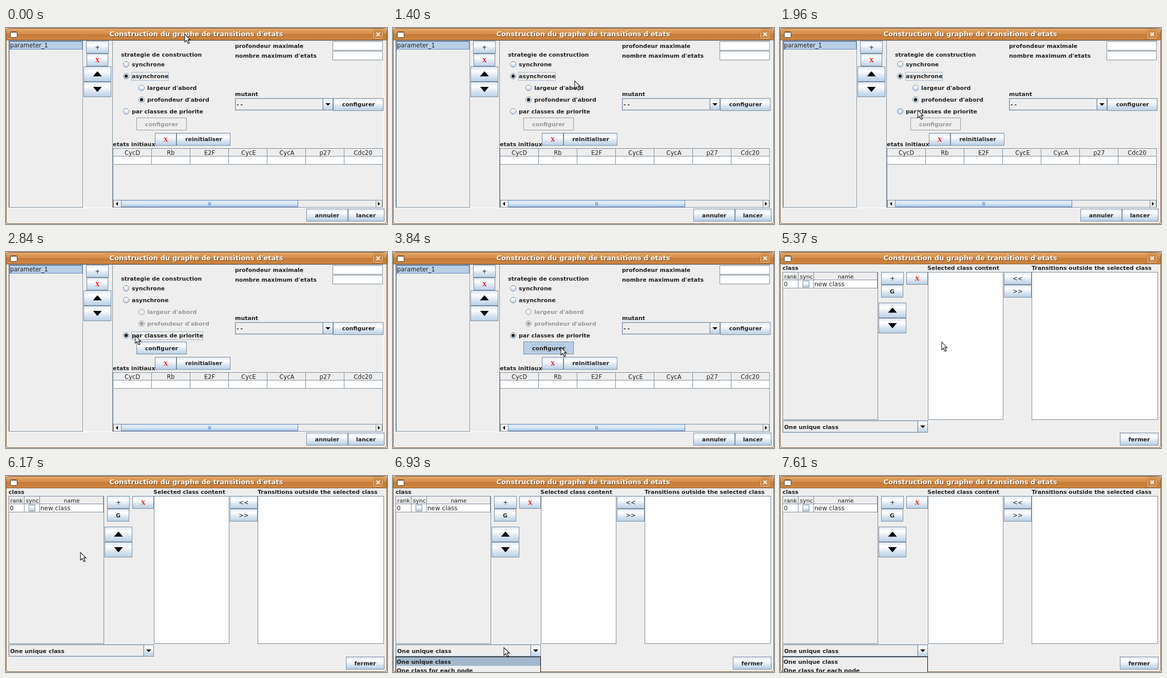
These frames come from a looping animation (742 px wide and 383 px high, 8000 ms). An HTML page:

```html
<!DOCTYPE html>
<html lang="fr">
<head>
<meta charset="utf-8">
<title>Construction du graphe</title>
<style>
html, body { margin: 0; width: 100%; height: 100%; overflow: hidden; background: #ddd; }
svg { display: block; width: 100%; height: 100%;
  --ink: #222; --ring: #7a8a99; --face: url(#face); }
text { font: bold 11px "DejaVu Sans", sans-serif; fill: var(--ink); }
.plain text, text.plain { font-weight: normal; font-size: 11.5px; }
.mid text, text.mid { text-anchor: middle; }
.btn rect, .radio { fill: var(--face); stroke: var(--ring); }
.btn text { text-anchor: middle; }
.btn .x { font: bold 12px "Liberation Serif", serif; fill: #f00; }
.dot { fill: var(--ink); }
.box { fill: #eee; stroke: #7a8a99; }
.white { fill: #fff; stroke: #7a8a99; }
.line { fill: none; stroke: #7a8a99; }
.shine { fill: none; stroke: #fff; }
.inner { fill: none; stroke: #b8cfe5; }
.focus { fill: none; stroke: #a3b8cc; }
.glow { fill: none; stroke: #b8cfe5; stroke-width: 2; }
.arrow { fill: #000; }

/* one loop: 8 s, so 1% is 80 ms */
.t { animation: 8s step-end infinite; }
.first { animation-name: first; }
.second { animation-name: second; }
.sub { animation-name: sub; }
.conf { animation-name: conf; }
.till-press { animation-name: till-press; }
.row-focus { animation-name: row-focus; }
.till-pick { animation-name: till-pick; }
.armed { animation-name: armed; }
.picked { animation-name: picked; }
.pressed { animation-name: pressed; }
.over1 { animation-name: over1; }
.over2 { animation-name: over2; }
.over3 { animation-name: over3; }
.over4 { animation-name: over4; }
.menu { animation-name: menu; }
.items { animation-name: items; }
.pick1 { animation-name: pick1; }
.pick2 { animation-name: pick2; }
@keyframes first { 0% { opacity: 1 } 50%, 100% { opacity: 0 } }
@keyframes second { 0% { opacity: 0 } 50%, 100% { opacity: 1 } }
@keyframes sub {
  0% { --ink: #222; --ring: #7a8a99; --face: url(#face) }
  32.5%, 100% { --ink: #999; --ring: #999; --face: #eee }
}
@keyframes conf {
  0% { --ink: #999; --ring: #999; --face: #eee }
  32.5% { --ink: #222; --ring: #7a8a99; --face: url(#face) }
  48%, 100% { --ink: #222; --ring: #7a8a99; --face: #b8cfe5 }
}
@keyframes till-press { 0% { opacity: 1 } 30%, 100% { opacity: 0 } }
@keyframes row-focus { 0% { opacity: 0 } 30% { opacity: 1 } 48%, 100% { opacity: 0 } }
@keyframes till-pick { 0% { opacity: 1 } 32.5%, 100% { opacity: 0 } }
@keyframes armed { 0% { --face: url(#face) } 30% { --face: #b8cfe5 } 32.5%, 100% { --face: url(#face) } }
@keyframes picked { 0% { opacity: 0 } 32.5%, 100% { opacity: 1 } }
@keyframes pressed { 0% { opacity: 0 } 48%, 100% { opacity: 1 } }
@keyframes over1 { 0% { opacity: 0 } 18% { opacity: 1 } 19%, 100% { opacity: 0 } }
@keyframes over2 { 0% { opacity: 0 } 19% { opacity: 1 } 21%, 100% { opacity: 0 } }
@keyframes over3 { 0% { opacity: 0 } 21.5% { opacity: 1 } 39.5%, 100% { opacity: 0 } }
@keyframes over4 { 0% { opacity: 0 } 40.5% { opacity: 1 } 48%, 100% { opacity: 0 } }
@keyframes menu { 0% { opacity: 0 } 86.125%, 100% { opacity: 1 } }
@keyframes items { 0% { opacity: 0 } 86.625%, 100% { opacity: 1 } }
@keyframes pick1 { 0% { opacity: 1 } 93.4%, 100% { opacity: 0 } }
@keyframes pick2 { 0% { opacity: 0 } 93.4% { opacity: 1 } 95.125%, 100% { opacity: 0 } }

.pointer { animation: pointer 8s linear infinite; }
@keyframes pointer {
  0%, 10.45% { transform: translate(348px, 12px) }
  12.5% { transform: translate(364px, 33px) }
  14.5% { transform: translate(386px, 64px) }
  16% { transform: translate(376px, 86px) }
  17.5% { transform: translate(354px, 103px) }
  19% { transform: translate(349px, 130px) }
  20.5%, 20.95% { transform: translate(347px, 149px) }
  22% { transform: translate(322px, 153px) }
  25.5%, 35.45% { transform: translate(247px, 163px) }
  35.5% { transform: translate(251px, 163px) }
  37.5%, 39.45% { transform: translate(354px, 173px) }
  44%, 67.12% { transform: translate(327px, 186px) }
  67.125% { transform: translate(315px, 176px) }
  70.5% { transform: translate(232px, 92px) }
  72.5% { transform: translate(182px, 66px) }
  74.5% { transform: translate(148px, 84px) }
  75.6% { transform: translate(143px, 112px) }
  77.125%, 77.6% { transform: translate(145px, 149px) }
  79.5% { transform: translate(164px, 224px) }
  81.8% { transform: translate(204px, 306px) }
  83.625%, 90.1% { transform: translate(216px, 335px) }
  95.125%, 100% { transform: translate(216px, 390px) }
}
</style>
</head>
<body>
<svg viewBox="0 0 742 383">
  <defs>
    <linearGradient id="face" x2="0" y2="1">
      <stop stop-color="#dde8f3"/><stop offset=".3" stop-color="#fff"/>
      <stop offset=".6" stop-color="#dde8f3"/><stop offset="1" stop-color="#b8cfe5"/>
    </linearGradient>
    <linearGradient id="bar" x2="0" y2="1">
      <stop stop-color="#e3a76b"/><stop offset=".45" stop-color="#d58e49"/>
      <stop offset=".5" stop-color="#c67c37"/><stop offset="1" stop-color="#ce8743"/>
    </linearGradient>
    <linearGradient id="thumb" x2="0" y2="1">
      <stop stop-color="#c8ddf2"/><stop offset=".35" stop-color="#e6f0fa"/>
      <stop offset="1" stop-color="#a9c6e4"/>
    </linearGradient>
    <path id="up" class="arrow" d="M-8.5 4.5L-1 -4.5Q0 -5.5 1 -4.5L8.5 4.5Z"/>
    <path id="down" class="arrow" d="M-8.5 -5L-1 4Q0 5 1 4L8.5 -5Z"/>
    <path id="drop" class="arrow" d="M-5 -2.5H5L0 2.5Z"/>
    <text id="title" class="mid" x="370.5" y="16" style="font-size:13.1px;fill:inherit">Construction du graphe de transitions d'etats</text>
  </defs>

  <!-- window -->
  <rect x=".5" y=".5" width="741" height="382" rx="5" fill="#eee" stroke="#85552b"/>
  <path d="M1 24V6Q1 1 6 1H736Q741 1 741 6V24Z" fill="url(#bar)"/>
  <path d="M1 23.5H741" stroke="#8f5a2a"/>
  <rect x="8.5" y="7.5" width="13" height="11" rx="1" fill="#fff" stroke="#4a3828"/>
  <path d="M9 8.5H21" stroke="#7b6a5a"/>
  <use href="#title" x="1" y="1" fill="#6e4520"/>
  <use href="#title" fill="#fff"/>
  <rect x="714.5" y="2.5" width="20" height="19" rx="4" fill="none" stroke="#a5662c"/>
  <rect x="715.5" y="3.5" width="18" height="17" rx="3" fill="#cf8845" stroke="#f0cfa8"/>
  <path d="M721.5 9L728 15.5M728 9L721.5 15.5" stroke="#fff" stroke-width="2"/>

  <!-- simulation settings -->
  <g class="t first">
    <path class="line" d="M5 24.5H735M5.5 25V351M207.5 25V351"/>
    <path class="shine" d="M5 351.5H735M734.5 25V352M150.5 26V351"/>
    <rect class="box" x="6.5" y="25.5" width="143" height="325"/>
    <rect x="7.5" y="26.5" width="141" height="15" fill="#b8cfe5" stroke="#6382bf"/>
    <text class="plain" x="8" y="38">parameter_1</text>
    <g class="btn">
      <rect x="156.5" y="25.5" width="43" height="24"/><text class="plain" x="178" y="42">+</text>
      <rect x="157.5" y="50.5" width="41" height="24"/><text class="x" x="178" y="67">X</text>
      <rect x="151.5" y="75.5" width="53" height="29"/><use href="#up" x="178" y="90"/>
      <rect x="151.5" y="105.5" width="53" height="29"/><use href="#down" x="178" y="120"/>
    </g>

    <text x="446" y="39">profondeur maximale</text>
    <text x="446" y="58">nombre maximum d'etats</text>
    <rect class="white" x="636.5" y="26.5" width="97" height="17"/>
    <rect class="white" x="636.5" y="45.5" width="97" height="17"/>

    <text x="224" y="56">strategie de construction</text>
    <circle class="radio" cx="234" cy="71" r="5.5"/>
    <text x="245" y="75">synchrone</text>
    <circle class="radio" cx="234" cy="94" r="5.5"/>
    <circle class="dot t till-pick" cx="234" cy="94" r="3.2"/>
    <rect class="focus t till-press" x="244.5" y="86.5" width="72" height="16"/>
    <text x="245" y="98">asynchrone</text>
    <g class="t sub">
      <circle class="radio" cx="264" cy="117" r="5.5"/>
      <circle class="glow t over1" cx="264" cy="117" r="4"/>
      <text x="275" y="121">largeur d'abord</text>
      <circle class="radio" cx="264" cy="140" r="5.5"/>
      <circle class="glow t over2" cx="264" cy="140" r="4"/>
      <circle class="dot" cx="264" cy="140" r="3.2"/>
      <text x="275" y="144">profondeur d'abord</text>
    </g>
    <g class="t armed">
      <circle class="radio" cx="234" cy="163" r="5.5"/>
      <circle class="glow t over3" cx="234" cy="163" r="4"/>
      <circle class="dot t picked" cx="234" cy="163" r="3.2"/>
    </g>
    <rect class="focus t row-focus" x="244.5" y="155.5" width="139" height="16"/>
    <text x="245" y="167">par classes de priorite</text>
    <g class="btn t conf">
      <rect x="254.5" y="175.5" width="97" height="24"/>
      <text x="303" y="192">configurer</text>
    </g>
    <rect class="glow t over4" x="256" y="177" width="94" height="21"/>
    <rect class="focus t pressed" x="270.5" y="180.5" width="65" height="14"/>

    <text x="446" y="133">mutant</text>
    <rect class="box" x="446.5" y="137.5" width="190" height="23"/>
    <rect class="inner" x="447.5" y="138.5" width="169" height="21"/>
    <text x="449" y="153" letter-spacing="3">--</text>
    <g class="btn">
      <rect x="617.5" y="137.5" width="19" height="23"/><use href="#drop" x="627" y="149.5"/>
      <rect x="637.5" y="137.5" width="97" height="24"/><text x="686.5" y="153">configurer</text>
      <rect x="290.5" y="205.5" width="41" height="24"/><text class="x" x="311" y="222">X</text>
      <rect x="332.5" y="205.5" width="104" height="24"/><text x="385" y="221">reinitialiser</text>
    </g>

    <text x="208" y="231">etats initiaux</text>
    <rect class="box" x="208.5" y="235.5" width="525" height="115"/>
    <rect x="209" y="251" width="524" height="15" fill="#fff"/>
    <path class="line" d="M209 250.5H733M209 266.5H733M283.5 236V266M358.5 236V266M433.5 236V266M508.5 236V266M583.5 236V266M658.5 236V266"/>
    <g class="plain mid">
      <text x="246" y="248">CycD</text>
      <text x="321" y="248">Rb</text>
      <text x="396.5" y="248">E2F</text>
      <text x="472.5" y="248">CycE</text>
      <text x="547" y="248">CycA</text>
      <text x="621.5" y="248">p27</text>
      <text x="695.5" y="248">Cdc20</text>
    </g>
    <rect class="box" x="209.5" y="336.5" width="523" height="14"/>
    <rect x="224.5" y="336.5" width="344" height="13" fill="url(#thumb)" stroke="#6382bf"/>
    <path d="M394.5 340V347M396.5 340V347M398.5 340V347" stroke="#6382bf"/>
    <path class="line" d="M720.5 337V350"/>
    <path class="arrow" d="M218 339.5V347.5L214 343.5ZM724.5 339.5V347.5L728.5 343.5Z"/>
    <g class="btn">
      <rect x="585.5" y="353.5" width="80" height="24"/><text x="625.5" y="370">annuler</text>
      <rect x="666.5" y="353.5" width="70" height="24"/><text x="701" y="370">lancer</text>
    </g>
  </g>

  <!-- priority classes -->
  <g class="t second">
    <text x="5" y="35">class</text>
    <text x="287" y="35">Selected class content</text>
    <text x="490" y="35">Transitions outside the selected class</text>
    <rect class="box" x="5.5" y="39.5" width="185" height="288"/>
    <rect x="6" y="55" width="183" height="15" fill="#fff"/>
    <path class="line" d="M6 54.5H190M6 70.5H190M35.5 40V70M65.5 40V70M189.5 40V70"/>
    <g class="plain mid">
      <text x="20.5" y="52" style="font-size:11px">rank</text>
      <text x="51.5" y="52" style="font-size:11px">sync</text>
      <text x="128" y="52" style="font-size:11px">name</text>
    </g>
    <g class="plain">
      <text x="7.5" y="67">0</text>
      <text x="67" y="67" style="font-size:12px">new class</text>
    </g>
    <rect class="radio" x="44.5" y="56.5" width="12" height="12"/>

    <g class="btn">
      <rect x="197.5" y="39.5" width="43" height="24"/><text class="plain" x="219" y="56">+</text>
      <rect x="246.5" y="39.5" width="41" height="24"/><text class="x" x="267" y="56">X</text>
      <rect x="197.5" y="64.5" width="42" height="24"/><text x="218.5" y="81">G</text>
      <rect x="192.5" y="99.5" width="53" height="29"/><use href="#up" x="219" y="114"/>
      <rect x="192.5" y="129.5" width="53" height="29"/><use href="#down" x="219" y="144"/>
    </g>
    <rect class="white" x="288.5" y="39.5" width="146" height="288"/>
    <rect class="white" x="490.5" y="39.5" width="245" height="288"/>
    <g class="btn">
      <rect x="436.5" y="39.5" width="53" height="24"/><text class="plain" x="463" y="56">&lt;&lt;</text>
      <rect x="436.5" y="64.5" width="53" height="24"/><text class="plain" x="463" y="81">&gt;&gt;</text>
    </g>
    <rect class="box" x="5.5" y="329.5" width="282" height="23"/>
    <rect class="inner" x="6.5" y="330.5" width="261" height="21"/>
    <text x="8" y="346">One unique class</text>
    <g class="btn">
      <rect x="268.5" y="329.5" width="19" height="23"/><use href="#drop" x="278" y="341.5"/>
      <rect x="662.5" y="353.5" width="74" height="24"/><text x="699.5" y="370">fermer</text>
    </g>

    <g class="t menu">
      <rect x="5.5" y="353.5" width="282" height="60" fill="#eee" stroke="#000"/>
      <g class="t items">
        <rect class="t pick1" x="6" y="354" width="281" height="17" fill="#a3b8cc"/>
        <rect class="t pick2" x="6" y="371" width="281" height="17" fill="#a3b8cc"/>
        <text x="7" y="367">One unique class</text>
        <text x="7" y="384">One class for each node</text>
      </g>
    </g>
  </g>

  <g class="pointer">
    <path d="M1.2 1.5V16.5L4.7 13.3L7.7 19.5L10.5 18.3L7.7 12.3H12.2Z" opacity=".25"/>
    <path d="M0 .3V15.3L3.5 11.9L6.3 17.9L8.9 16.7L6.2 10.9H10.7Z" fill="#fff" stroke="#111" stroke-width="1.1"/>
  </g>
</svg>
</body>
</html>
```
